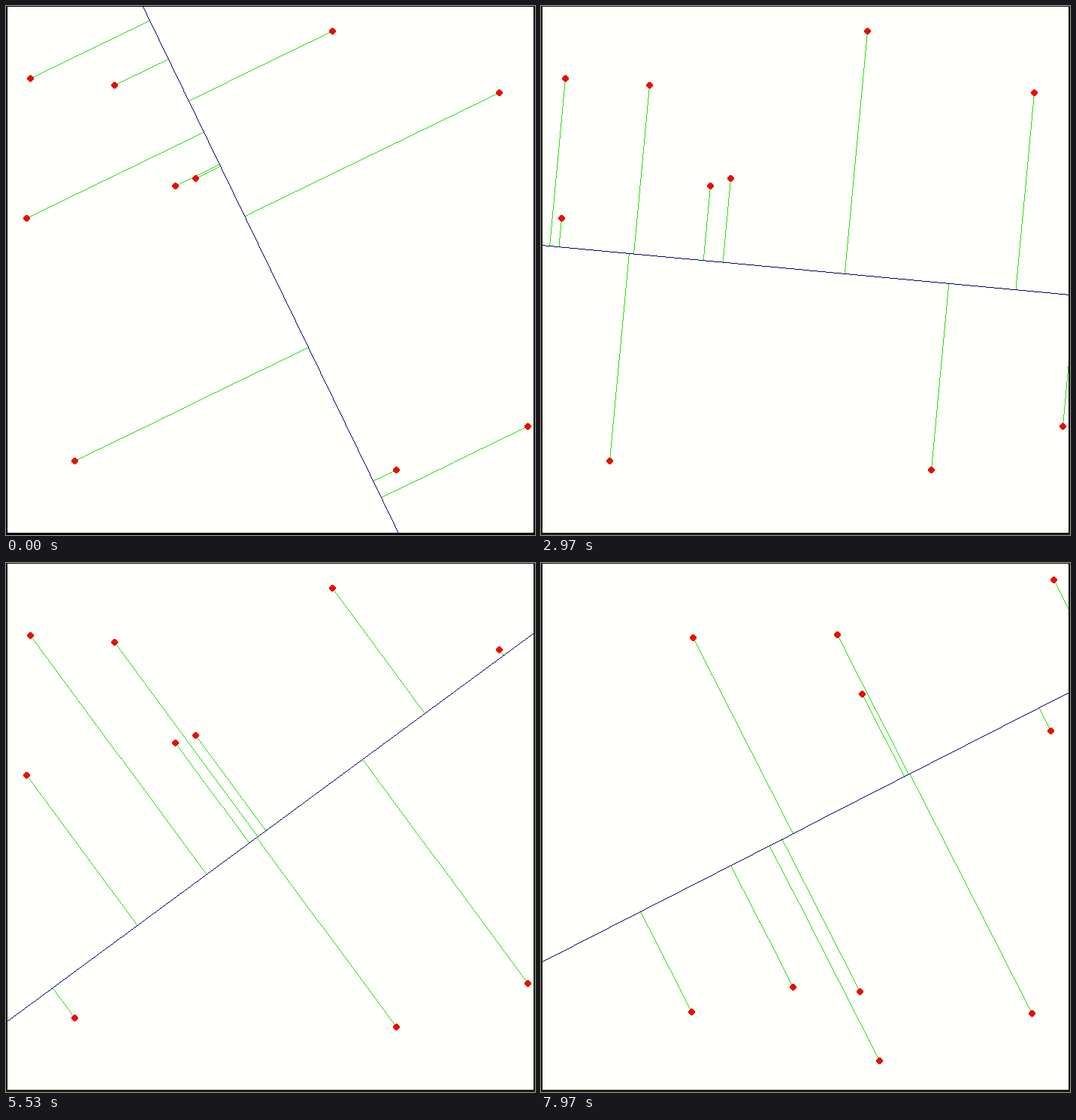
A matplotlib script that plays this animation: 704 by 704 pixels, repeating every 8000 ms.

```python
import numpy as np
import matplotlib.pyplot as plt
from matplotlib.animation import FuncAnimation

SIZE, DPI = 704, 100
STEP, FRAMES = 40, 200
CENTER = np.array([352, 351])
REACH = 600

PAPER, NAVY, GREEN, RED = (255, 255, 251), (12, 0, 100), (40, 220, 20), (234, 12, 0)
BLACK, OLIVE = (0, 0, 0), (31, 29, 8)

BEFORE = np.array([(32, 96), (144, 105), (225, 239), (252, 229), (434, 33),
                   (656, 115), (27, 282), (91, 605), (519, 617), (694, 559)])
AFTER = np.array([(202, 99), (394, 95), (427, 174), (335, 564), (682, 22),
                  (678, 223), (200, 597), (424, 570), (450, 662), (653, 599)])

# steady turns with rests between them: time in ms, angle in degrees
TIMES = [830, 1430, 1700, 2970, 3670, 4000, 4930, 5100, 6570, 7330, 7970]
ANGLES = [-64.1, -45.9, -45.9, -5.35, 28.6, 28.6, 57.25, 57.25, -14, -14, 27.05]

# pixel offsets of one dot
gy, gx = np.mgrid[-4:5, -4:5]
DISC = np.argwhere(gx ** 2 + gy ** 2 <= 17) - 4


def points_at(t):
    """The second set takes over point by point in seven quick steps."""
    step = np.clip((t - 6800) // 50 + 1, 0, 7)
    n = int(np.ceil(step * len(BEFORE) / 7))
    return np.vstack([AFTER[:n], BEFORE[n:]])


def paint(canvas, pixels, color):
    x, y = np.rint(pixels).astype(int).T
    ok = (x >= 0) & (x < SIZE) & (y >= 0) & (y < SIZE)
    canvas[y[ok], x[ok]] = color


def line(canvas, start, end, color):
    """A one-pixel line without smoothing."""
    n = int(np.abs(end - start).max()) + 2
    paint(canvas, np.linspace(start, end, n), color)


def frame_edge(canvas, color):
    canvas[:1] = canvas[-3:] = color
    canvas[:, :2] = canvas[:, -2:] = color


def render(t):
    canvas = np.full((SIZE, SIZE, 3), PAPER, dtype=np.uint8)
    a = np.radians(np.interp(t, TIMES, ANGLES))
    d = np.array([np.cos(a), -np.sin(a)])
    points = points_at(t)
    feet = CENTER + np.outer((points - CENTER) @ d, d)
    for p, foot in zip(points, feet):
        line(canvas, p, foot, GREEN)
    line(canvas, CENTER - REACH * d, CENTER + REACH * d, NAVY)
    for p in points:
        paint(canvas, p + DISC, RED)
    frame_edge(canvas, BLACK if t < 70 else OLIVE)
    return canvas


fig = plt.figure(figsize=(SIZE / DPI, SIZE / DPI), dpi=DPI)
stage = fig.figimage(render(0), origin="upper")


def draw(i):
    stage.set_data(render(i * STEP + 10))
    return [stage]


anim = FuncAnimation(fig, draw, frames=FRAMES, interval=STEP, repeat=True,
                     repeat_delay=0, blit=False)
plt.show()
```
